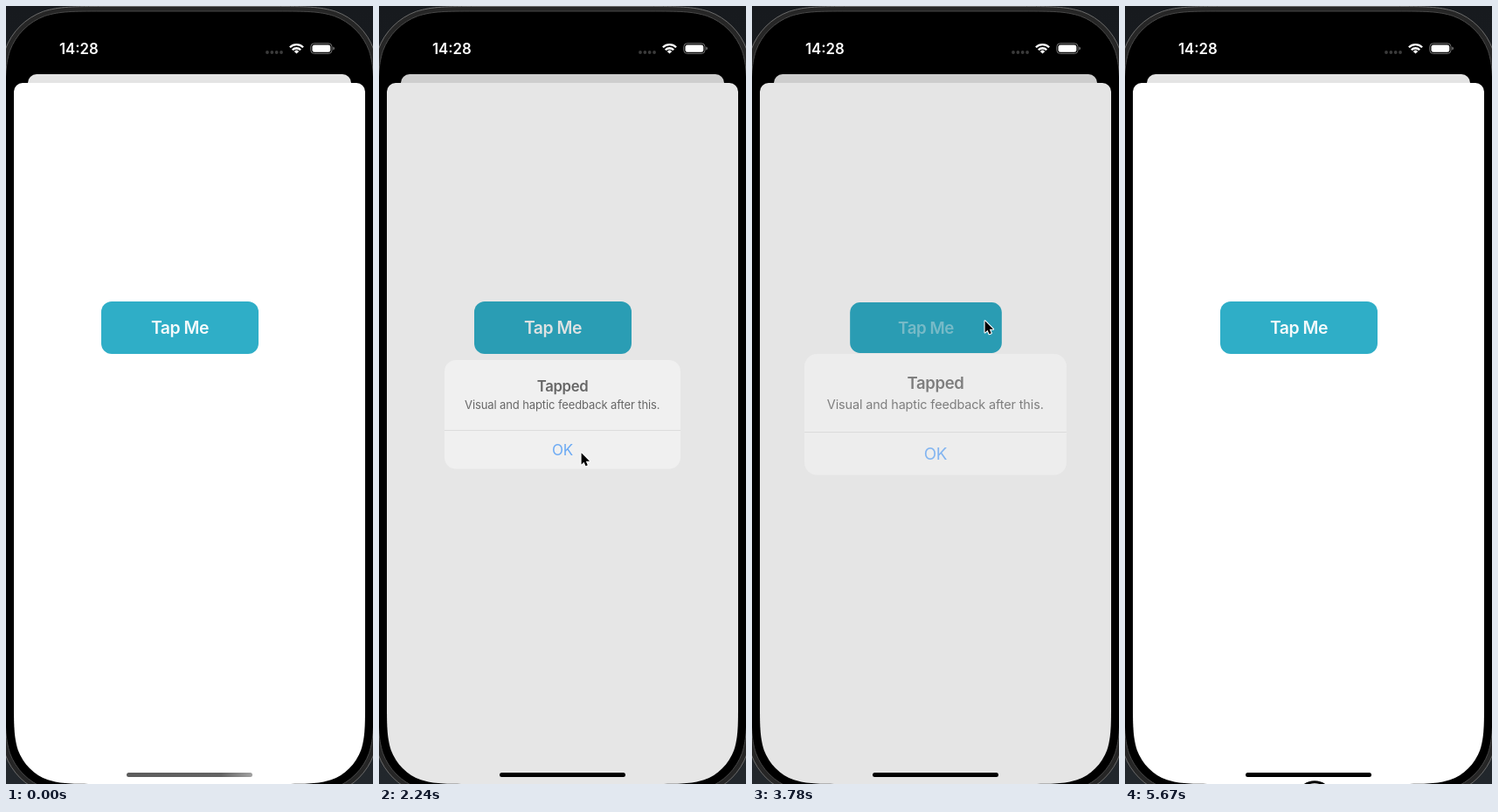
Recreate the animation shown at these times as an HTML page. Size 420 by 890 pixels, loop 5.74 s.

```html
<!DOCTYPE html>
<html lang="en">
<head>
<meta charset="utf-8">
<title>Tap feedback</title>
<style>
  html, body { margin: 0; width: 100%; height: 100%; overflow: hidden; background: #000; }
  svg { display: block; width: 420px; height: 890px; }
  text { font-family: Inter, "Liberation Sans", sans-serif; text-anchor: middle; }
  .bold { font-weight: 600; }
</style>
</head>
<body>
<svg viewBox="0 0 420 890">
  <defs>
    <linearGradient id="desk" x2="0" y2="1">
      <stop offset="0" stop-color="#171a1e"/>
      <stop offset="1" stop-color="#22272c"/>
    </linearGradient>
    <linearGradient id="bar">
      <stop offset="0" stop-color="#5c5c5c"/>
      <stop offset=".75" stop-color="#636363"/>
      <stop offset="1" stop-color="#a2a2a2"/>
    </linearGradient>
    <clipPath id="clip"><path id="screen"/></clipPath>
    <path id="arrow" d="M0 0V14.6l3.3-3.1 2.2 5.1 2.5-1.1-2.2-5h4.7Z"/>
  </defs>

  <!-- device -->
  <rect width="420" height="890" fill="url(#desk)"/>
  <path id="rim" fill="#262626" stroke="#6b6b6b"/>
  <path id="bezel" stroke="#474747"/>

  <!-- status bar -->
  <g fill="#fff">
    <text class="bold" x="83.3" y="54.6" font-size="16.8">14:28</text>
    <path d="M299 53h17" stroke="#3b3b3b" stroke-width="3.8" stroke-linecap="round" stroke-dasharray="0 5.35"/>
    <g fill="none" stroke="#fff" stroke-width="2.3">
      <path d="M324.9 47.2a10.8 10.8 0 0 1 15.2 0"/>
      <path d="M327.8 50.2a6.7 6.7 0 0 1 9.4 0"/>
    </g>
    <path d="M332.5 54.6l-2.7-2.7a3.9 3.9 0 0 1 5.4 0Z"/>
    <rect x="348.8" y="42.8" width="24.2" height="11.6" rx="3.8" fill="none" stroke="#777"/>
    <rect x="350.5" y="44.4" width="20.8" height="8.4" rx="2.4"/>
    <path d="M374.3 46.6q1.7.5 1.7 2t-1.7 2Z" fill="#777"/>
  </g>

  <!-- app -->
  <g clip-path="url(#clip)">
    <rect x="25" y="78" width="370" height="40" rx="10" fill="#e4e4e4"/>
    <rect x="9" y="88" width="402" height="820" rx="10" fill="#fff"/>
    <g id="button">
      <rect x="109" y="338" width="180" height="60" rx="12" fill="#2faec7"/>
      <text id="label" class="bold" x="199" y="375.2" font-size="19.4" letter-spacing="-.45" fill="#f5fafb">Tap Me</text>
    </g>
    <rect id="dim" x="9" y="78" width="402" height="812"/>
    <g id="alert">
      <rect x="75" y="405" width="270" height="124.5" rx="13" fill="#fff" fill-opacity=".7"/>
      <path d="M75 485.5H345" stroke="#d0d0d0" stroke-width=".9"/>
      <text class="bold" x="210" y="441" font-size="16.7" letter-spacing="-.3">Tapped</text>
      <text x="209.8" y="461.2" font-size="13" letter-spacing="-.11">Visual and haptic feedback after this.</text>
      <text x="210" y="514" font-size="17" letter-spacing="-.3" fill="#0a7aff">OK</text>
    </g>
    <rect id="home" x="138" y="877" width="144" height="5" rx="2.5"/>
  </g>

  <!-- pointer -->
  <g id="pointer">
    <g id="ring" fill="none">
      <circle r="20.2" stroke="#fff" stroke-width="4.6"/>
      <circle r="20.2" stroke="#000" stroke-width="2.9"/>
    </g>
    <g transform="translate(.6 1.3) scale(.9)">
      <use href="#arrow" fill="#fff" stroke="#fff" stroke-width="2.4" stroke-linejoin="round"/>
      <use href="#arrow"/>
    </g>
  </g>
</svg>

<script>
  const LOOP = 5740, STEP = 70, LEAD = 20;
  const $ = id => document.getElementById(id);
  const set = (id, name, value) => $(id).setAttribute(name, value);

  // finger down and up, in ms: button, OK, button, OK, off screen
  const taps = [[840, 1400], [2100, 2170], [3010, 3710], [4690, 4760], [5670, LOOP]];
  const presses = [taps[0], taps[2]];
  const alerts = [[taps[0][1], taps[1][1]], [taps[2][1], taps[3][1]]];

  // pointer moves: start, end, x, y
  const moves = [
    [70, 350, 235, 370], [1500, 1890, 231, 510],
    [2400, 2730, 263, 348], [2730, 2940, 266, 359],
    [3850, 4200, 256, 515], [4250, 4480, 255, 510],
    [4830, 5110, 232, 867], [5300, 5400, 217, 908]
  ];

  const smooth = u => (u = Math.min(1, Math.max(0, u)), u * u * (3 - 2 * u));
  const spring = (ms, w) => ms <= 0 ? 0 : ms > 480 ? 1 : 1 - Math.exp(-w * ms) * (1 + w * ms);
  const total = (spans, f) => spans.reduce((sum, [a, b]) => sum + f(a - LEAD, b - LEAD), 0);
  const scaleAt = (x, y, s) => `translate(${x} ${y}) scale(${s}) translate(${-x} ${-y})`;

  // rectangle with continuous-curvature corners
  function squircle(x, y, w, h, r) {
    const half = [[1.529, 0], [1.088, 0], [.868, 0], [.631, .075], [.373, .169]];
    const curve = [...half, ...half.map(([a, b]) => [b, a]).reverse()].map(p => p.map(v => v * r));
    const corners = [
      ([a, b]) => [x + a, y + b],
      ([a, b]) => [x + b, y + h - a],
      ([a, b]) => [x + w - a, y + h - b],
      ([a, b]) => [x + w - b, y + a]
    ];
    return "M" + corners.map(place => {
      const [first, ...rest] = curve.map(place);
      return `${first}C${rest.join(" ")}`;
    }).join("L") + "Z";
  }

  // outline at a distance around the 402 x 874 display
  const around = d => squircle(9 - d, 16 - d, 402 + 2 * d, 874 + 2 * d, 62 + d);

  function tipAt(t) {
    const from = t < 70 ? [217, 908] : [208, 551];
    return moves.reduce(([px, py], [a, b, x, y]) => {
      const k = smooth((t - a) / (b - a));
      return [px + (x - px) * k, py + (y - py) * k];
    }, from);
  }

  function render(t) {
    const press = total(presses, (a, b) => smooth((t - a) / 150) - smooth((t - b) / 250));
    set("button", "transform", scaleAt(199, 368, 1 - 0.05 * press));
    set("label", "opacity", 1 - 0.8 * press);

    const shown = w => total(alerts, (a, b) => spring(t - a, w) - spring(t - b, w));
    const opened = alerts[t < alerts[1][0] ? 0 : 1][0] - LEAD;
    set("dim", "opacity", 0.2 * shown(0.0192));
    set("alert", "opacity", shown(0.0168));
    set("alert", "transform", scaleAt(210, 467.2, 1.2 - 0.2 * spring(t - opened, 0.0168)));

    set("home", "fill", t < taps[0][1] ? "url(#bar)" : "#000");
    set("pointer", "transform", `translate(${tipAt(t)})`);
    set("ring", "visibility", taps.some(([a, b]) => t >= a && t < b) ? "visible" : "hidden");
  }

  set("screen", "d", around(0));
  set("bezel", "d", around(10));
  set("rim", "d", around(15.5));

  const begin = performance.now();
  function tick() {
    const t = (performance.now() - begin) % LOOP;
    render(Math.floor(t / STEP) * STEP);
    requestAnimationFrame(tick);
  }
  tick();
</script>
</body>
</html>
```
